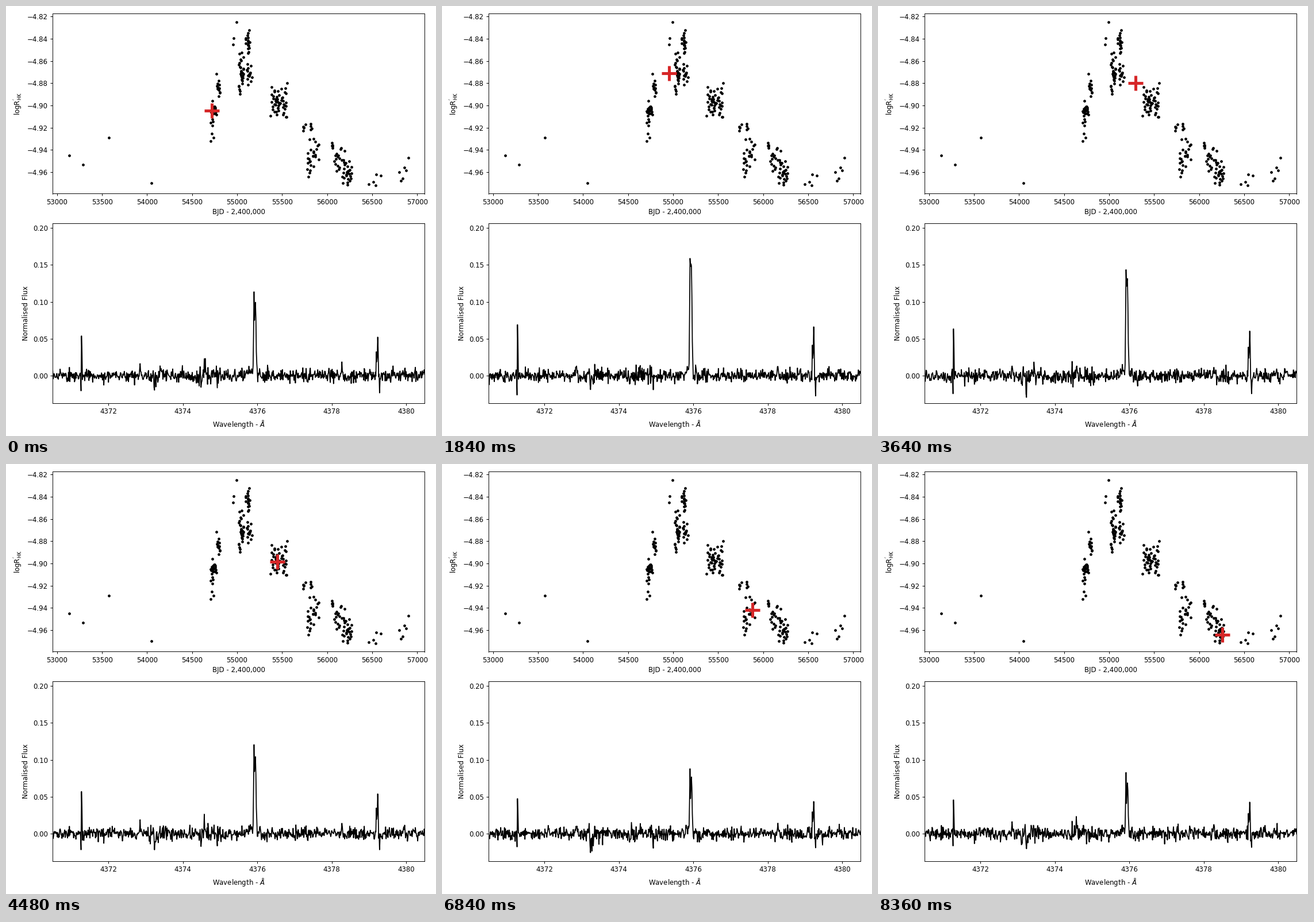
A matplotlib script that plays this animation: 748x748 px, repeating every 8400 ms.

```python
import numpy as np
import matplotlib.pyplot as plt
from matplotlib.animation import FuncAnimation

SIZE, DPI = 748, 85
FRAMES, INTERVAL = 210, 40
LEFT, RIGHT = 81.2, 728.3
plt.rcParams.update({"font.family": "DejaVu Sans", "font.size": 10})

fig = plt.figure(figsize=(SIZE / DPI, SIZE / DPI), dpi=DPI, facecolor="white")
rng = np.random.default_rng(5)


def add_axes(top, bottom, xlim, ylim):
    ax = fig.add_axes([LEFT / SIZE, 1 - bottom / SIZE,
                       (RIGHT - LEFT) / SIZE, (bottom - top) / SIZE])
    ax.set(xlim=xlim, ylim=ylim)
    return ax


def label(x, y, text, rotation=0):
    fig.text(x / SIZE, 1 - y / SIZE, text, ha="center", va="baseline",
             rotation=rotation, rotation_mode="anchor")


def to_data(px, py):
    """Stage position to date and activity index."""
    return (53000 + (np.asarray(px) - 88.8) / 0.1566,
            -4.82 - (np.asarray(py) - 18.3) / 1934.5)


act = add_axes(13.5, 326.5, to_data([LEFT, RIGHT], 0)[0], (-4.9793, -4.8175))
spec = add_axes(378, 691, (4370.5, 4380.5), (-0.0371, 0.2063))
act.set_yticks(np.arange(-4.96, -4.81, 0.02))
spec.set_yticks(np.arange(0, 0.21, 0.05))
label(405, 362, "BJD - 2,400,000")
label(405, 731.5, r"Wavelength - $\mathit{Å}$")
label(24, 170, r"log$\mathrm{R}^{'}_{\mathrm{HK}}$", 90)
label(38, 534.5, "Normalised Flux", 90)

# Isolated measurements, then observing seasons as x, y ranges and counts
dots = [(110.5, 260), (134, 276), (179, 229), (253, 308), (366, 118),
        (395, 67), (396, 56), (401.5, 28), (488.5, 134), (631, 310),
        (639, 306), (643, 311.5), (644, 293), (652, 295), (684, 289),
        (687, 304), (690, 300), (693, 281), (696, 286), (700, 264)]
seasons = [(356, 362, 156, 243, 12), (356, 366, 174, 190, 15),
           (366, 372, 128, 158, 12), (405, 414, 78, 155, 28),
           (417, 425, 42, 84, 17), (418, 429, 99, 137, 15),
           (460, 488, 141, 195, 50), (517, 533, 203, 219, 9),
           (523, 544, 227, 297, 26), (567, 568, 234, 251, 5),
           (571, 590, 243, 290, 18), (585, 601, 268, 313, 27)]
for x0, x1, y0, y1, n in seasons:
    spread = (np.arange(n) + rng.random(n)) / n
    spread = spread + 0.08 * np.sin(2 * np.pi * spread)  # denser middle
    dots += zip(rng.uniform(x0, x1, n), y0 + (y1 - y0) * spread)
act.plot(*to_data(*np.transpose(dots)), "k.")

# Key positions of the running mean: frame, x, y
path = np.array([(0, 358, 182), (22, 366.5, 151), (44, 393, 119),
                 (69, 419, 94), (88, 445, 129), (112, 472, 170),
                 (132, 481, 165), (139, 486, 185), (154, 524, 243),
                 (171, 540, 254), (209, 599, 297)])
cross, = act.plot([], [], "+", color="tab:red", ms=22, mew=4.3, zorder=5)

wave = np.linspace(4370.5, 4380.5, 801)


def bump(centre, width, height):
    return height * np.exp(-((wave - centre) / width) ** 2)


# Fixed pattern plus a running mean of fresh noise, rougher near some lines
WINDOW = 20
level = 0.0031 + bump(4373.3, 0.2, 0.002) + bump(4374.6, 0.4, 0.002)
raw = np.cumsum(rng.normal(size=(FRAMES + WINDOW, wave.size)), axis=0)
noise = level * (rng.normal(size=wave.size)
                 + (raw[WINDOW:] - raw[:-WINDOW]) / WINDOW ** 0.5)
for centre, height in [(4372.85, 0.014), (4373.24, -0.02), (4374.4625, 0.018),
                       (4374.4875, -0.013), (4374.925, -0.018),
                       (4377.3625, -0.014), (4378.275, 0.013)]:
    noise += bump(centre, 0.01, height)
noise += bump(4375.83, 0.05, 0.009) + bump(4376.06, 0.04, 0.005)

flux, = spec.plot([], [], "k-", lw=1.5)


def line(start, shape, height):
    """Emission line whose shape is sampled every 0.0125 from start."""
    nodes = start + 0.0125 * np.arange(len(shape))
    return height * np.interp(wave, nodes, shape, left=0, right=0)


def update(i):
    x, y = to_data(np.interp(i, path[:, 0], path[:, 1]),
                   np.interp(i, path[:, 0], path[:, 2]))
    cross.set_data([x], [y])

    # Lines strengthen with activity; the core reversal fills in
    main = 0.072 + 0.113 * np.exp((y + 4.8591) / 0.044)
    side = 0.02 + 0.3 * main
    core, second = min(1, main / 0.17), 0.75 + 1.3 * main
    peaks = (line(4375.8875, [0.1, 0.5, 1, core, (core + second) / 2, second,
                              0.7, 0.3, 0.15, 0], main)
             + line(4371.25, [0, -0.4, 1, 0.6, 0], side)
             + line(4379.1875, [0, 0.6, 0.35, 0.5, 1, 0.6, 0, 0, -0.4, 0],
                    side))
    flux.set_data(wave, np.where(peaks == 0, noise[i], peaks + 0.3 * noise[i]))
    return cross, flux


anim = FuncAnimation(fig, update, frames=FRAMES, interval=INTERVAL,
                     repeat=True, repeat_delay=0, blit=False)
plt.show()
```
